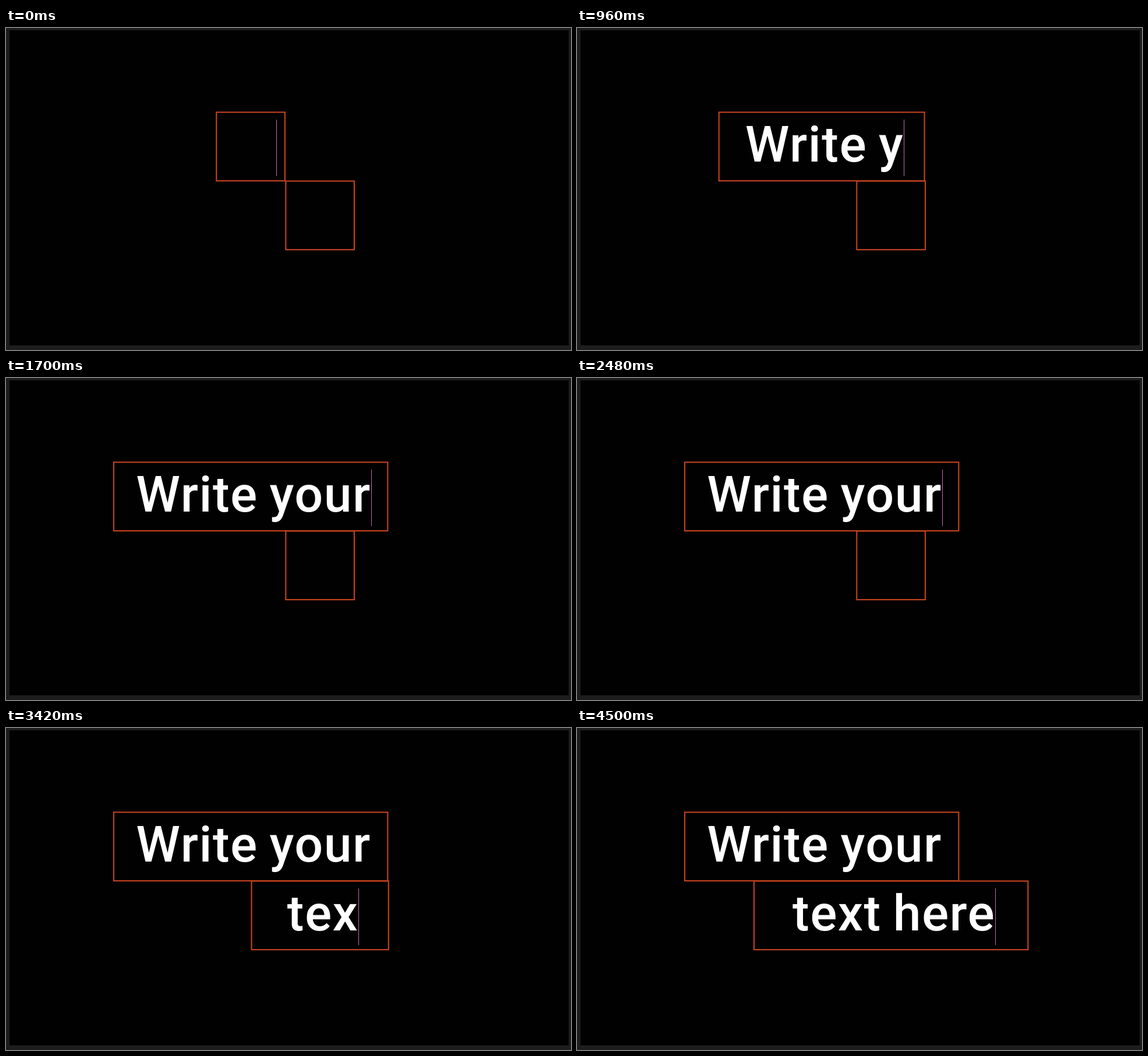
Animation of 970 by 552 pixels, one loop 5.06 s. Source, as an HTML page:

```html
<!DOCTYPE html>
<html lang="en">
<head>
<meta charset="utf-8">
<title>Write your text here</title>
<style>
  html, body { margin: 0; width: 100%; height: 100%; overflow: hidden; background: #1d1d1d; }
  svg { display: block; width: 970px; height: 552px; }
  text {
    font: 500 86px Roboto, "Open Sans", sans-serif;
    letter-spacing: 1.5px;
    word-spacing: -3px;
    text-anchor: middle;
    fill: #fff;
  }
  .box { fill: none; stroke: #c6431f; stroke-width: 2.1; }
</style>
</head>
<body>
<svg id="stage" viewBox="0 0 970 552">
  <rect x="6" y="4" width="960" height="540" fill="#010101"/>
</svg>
<script>
const LOOP = 5060;
const CELL = 117.6;
const GROW = 120;
const CURSOR_LEAD = 40;
const stage = document.getElementById('stage');

function add(tag, attrs) {
  const el = document.createElementNS('http://www.w3.org/2000/svg', tag);
  set(el, attrs);
  return stage.appendChild(el);
}

function set(el, attrs) {
  for (const key in attrs) el.setAttribute(key, attrs[key]);
}

// keys: when each character appears; grows: when the box widens by one cell
const lines = [
  {
    words: 'Write your', center: 420.1, top: 144.4,
    keys: [40, 180, 320, 460, 600, 740, 880, 1020, 1160, 1300],
    grows: [40, 800, 1060]
  },
  {
    words: 'text here', center: 539.1, top: 262.4,
    keys: [2600, 2740, 3420, 3560, 3700, 3830, 3960, 4100, 4240],
    grows: [3020, 3800, 4160]
  }
];

for (const line of lines) {
  line.box = add('rect', { class: 'box', y: line.top, height: CELL });
  line.textX = line.center + 5;
  line.label = add('text', { x: line.textX, y: line.top + 84.6 });
}
const cursor = add('rect', { width: 1, height: 97, fill: '#c06ab4' });

const easeOut = p => 1 - (1 - p) ** 2;
const progress = (t, start) => easeOut(Math.min(1, Math.max(0, (t - start) / GROW)));
const typed = (line, t) =>
  line.words.slice(0, line.keys.filter(k => k <= t).length).trimEnd();

function textWidth(line, words) {
  line.label.textContent = words;
  return line.label.getComputedTextLength();
}

function render(t) {
  const active = lines[t + CURSOR_LEAD < lines[1].keys[0] ? 0 : 1];
  const width = textWidth(active, typed(active, t + CURSOR_LEAD));
  set(cursor, {
    x: Math.round(active.textX + width / 2),
    y: Math.round(active.top + 12.6)
  });

  for (const line of lines) {
    const cells = line.grows.reduce((n, start) => n + progress(t, start), 1);
    set(line.box, { x: line.center - cells * CELL / 2, width: cells * CELL });
    line.label.textContent = typed(line, t);
  }
}

const began = performance.now();
function tick() {
  render((performance.now() - began) % LOOP);
  requestAnimationFrame(tick);
}
tick();
</script>
</body>
</html>
```
